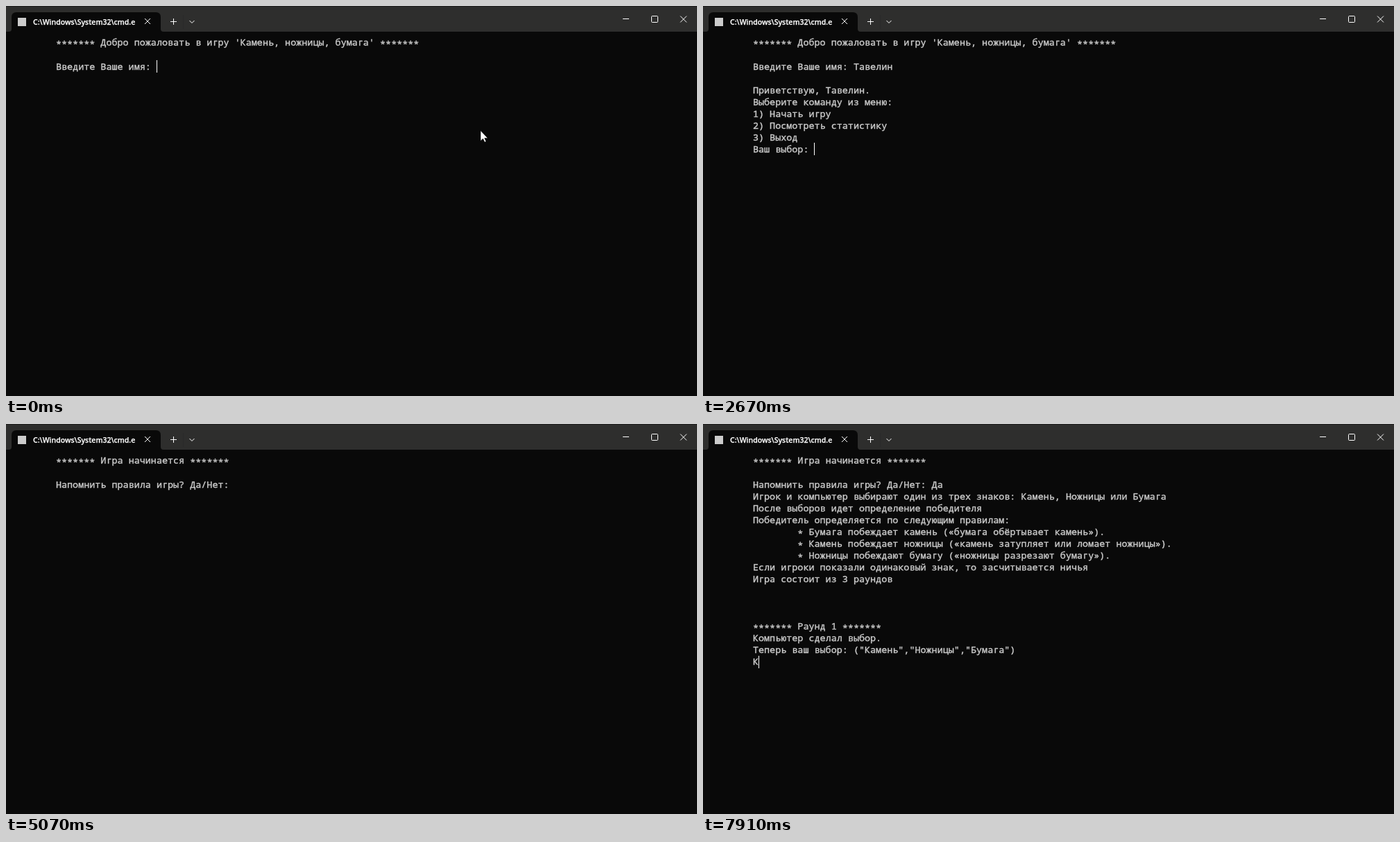
Write an HTML page that moves like this. It is 996 px wide and 562 px high and loops after 8 s.

```html
<!DOCTYPE html>
<html lang="ru">
<head>
<meta charset="utf-8">
<title>Камень, ножницы, бумага</title>
<style>
  html, body { margin: 0; width: 100%; height: 100%; overflow: hidden; background: #090909; }
  svg, pre, #caret { position: absolute; }
  svg { left: 0; top: 0; }
  pre {
    margin: 0; left: 7.5px; top: 44.4px; color: #ccc;
    font: 500 13.43px/17.06px "Noto Sans Mono", "DejaVu Sans Mono", monospace;
    font-variant-ligatures: none;
    -webkit-text-stroke: .4px #ccc;
  }
  /* asterisks sit at mid-height */
  pre i { position: relative; top: 3px; font-style: normal; }
  #caret { width: 1px; height: 18px; background: #fff; }
</style>
</head>
<body>
<svg width="996" height="562" viewBox="0 0 996 562" fill="none" stroke="#fff">
  <g stroke="none">
    <rect width="996" height="37" fill="#2e2e2d"/>
    <rect width="996" height="1" fill="#1c1c1c"/>
    <path d="M4 37Q8 37 8 33V16Q8 9 15 9H216Q223 9 223 16V33Q223 37 227 37Z" fill="#090909"/>
    <rect x="17" y="17" width="12" height="12" fill="#ccc"/>
    <text x="39" y="27" fill="#fff" stroke="#fff" stroke-width=".25" font-family="Open Sans, Noto Sans, sans-serif" font-size="10.5" font-weight="600">C:\Windows\System32\cmd.e</text>
  </g>
  <path d="M200 18l8 8m0-8l-8 8M237 22.5h9m-4.5-4.5v9M264.5 21l3.5 3.5 3.5-3.5"/>
  <path d="M255.5 13v20" stroke="#292929"/>
  <path d="M889 18.5h9M972 14.5l9 9m0-9l-9 9"/>
  <rect x="930.5" y="14.5" width="9" height="9" rx="1"/>
  <path id="pointer" d="M684 179.5v15l3.5-3.2 2.4 5 2.2-1-2.3-4.9h4.6Z" fill="#fff" stroke="#000" stroke-width=".6"/>
</svg>
<pre id="screen"></pre>
<div id="caret"></div>
<script>
const LOOP = 8000, CELL_W = 8.06, CELL_H = 17.06, LEFT = 7.5, TOP = 44.4;
const POINTER_HIDDEN_AT = 700;
const name = 'Тавелин';
const tab = ' '.repeat(8);
const indent = lines => lines.map(line => line && tab + line).join('\n');

const welcome = indent([
  "******* Добро пожаловать в игру 'Камень, ножницы, бумага' *******",
  '',
  'Введите Ваше имя: ',
]);
const menu = welcome + name + '\n\n' + indent([
  `Приветствую, ${name}.`,
  'Выберите команду из меню:',
  '1) Начать игру',
  '2) Посмотреть статистику',
  '3) Выход',
  'Ваш выбор: ',
]);
const start = indent([
  '******* Игра начинается *******',
  '',
  'Напомнить правила игры? Да/Нет: ',
]);
const round = start + 'Да\n' + indent([
  'Игрок и компьютер выбирают один из трех знаков: Камень, Ножницы или Бумага',
  'После выборов идет определение победителя',
  'Победитель определяется по следующим правилам:',
  tab + '* Бумага побеждает камень («бумага обёртывает камень»).',
  tab + '* Камень побеждает ножницы («камень затупляет или ломает ножницы»).',
  tab + '* Ножницы побеждают бумагу («ножницы разрезают бумагу»).',
  'Если игроки показали одинаковый знак, то засчитывается ничья',
  'Игра состоит из 3 раундов',
  '', '', '',
  '******* Раунд 1 *******',
  'Компьютер сделал выбор.',
  'Теперь ваш выбор: ("Камень","Ножницы","Бумага")',
]) + '\n' + tab;

// [time, text up to the caret, caret hidden]
const steps = [
  [0, welcome],
  ...[700, 900, 1100, 1300, 1500, 1770, 2140].map((t, i) => [t, welcome + name.slice(0, i + 1)]),
  [2670, menu],
  [3370, menu, true],
  [3900, menu],
  [4100, menu + '1'],
  [4300, menu + '1\n'],
  [4340, '\n'.repeat(10)],
  [4370, start],
  [5030, start, true],
  [5510, start + 'Д'],
  [5940, start + 'Да'],
  [6540, start + 'Да\n'],
  [6570, round],
  [7250, round, true],
  [7780, round],
  [7900, round + 'К'],
];

const [screen, caret, pointer] = ['screen', 'caret', 'pointer'].map(id => document.getElementById(id));
let shown;

function show(step) {
  const [, text, hidden] = step;
  const lines = text.split('\n');
  screen.innerHTML = text.replace(/\*+/g, '<i>$&</i>');
  caret.style.left = Math.floor(LEFT + lines.at(-1).length * CELL_W) + 'px';
  caret.style.top = Math.floor(TOP + (lines.length - 1) * CELL_H) + 'px';
  caret.style.visibility = hidden ? 'hidden' : 'visible';
}

function draw() {
  const t = performance.now() % LOOP;
  const step = steps.findLast(([time]) => time <= t);
  if (step !== shown) show(shown = step);
  pointer.style.visibility = t < POINTER_HIDDEN_AT ? 'visible' : 'hidden';
  requestAnimationFrame(draw);
}
draw();
</script>
</body>
</html>
```
